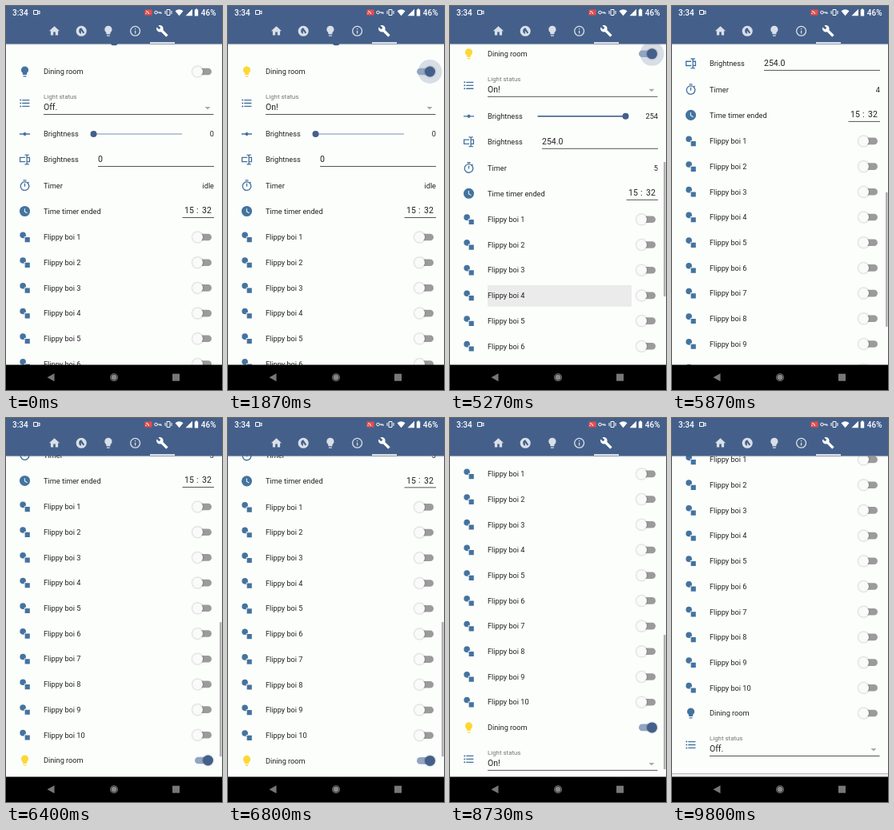
An HTML page that plays this animation: 270 by 480 pixels, repeating every 9.87 s.

```html
<!DOCTYPE html>
<html lang="en">
<head>
<meta charset="utf-8">
<title>Smart home controls</title>
<style>
  html, body { margin: 0; height: 100%; overflow: hidden; background: #fcfefc; }
  svg { display: block; width: 100vw; height: 100vh; }
  text { font: 9.2px Roboto, sans-serif; fill: #212121; }
  .big { font-size: 10.5px; }
  .small { font-size: 7.9px; fill: #757575; }
  .end { text-anchor: end; }
  .icon { fill: #44739e; fill-rule: evenodd; }
  .line { stroke: #555; stroke-width: 1; }
  .thumb { filter: drop-shadow(0 .7px .8px rgba(0, 0, 0, .35)); }
</style>
</head>
<body>
<svg id="stage" viewBox="0 0 270 480"></svg>
<script>
const LOOP = 9870, BLUE = '#44608a';
const icons = {
  bulb: 'M12 2A7 7 0 0 0 5 9C5 11.38 6.19 13.47 8 14.74V17A1 1 0 0 0 9 18H15A1 1 0 0 0 16 17V14.74C17.81 13.47 19 11.38 19 9A7 7 0 0 0 12 2M9 21A1 1 0 0 0 10 22H14A1 1 0 0 0 15 21V20H9Z',
  list: 'M7 5H21V7H7ZM7 11H21V13H7ZM7 17H21V19H7Z' + [6, 12, 18].map(y => `M2.5 ${y}a1.5 1.5 0 1 0 3 0a1.5 1.5 0 1 0 -3 0`).join(''),
  slider: 'M2 11H9.17C9.58 9.83 10.69 9 12 9S14.42 9.83 14.83 11H22V13H14.83C14.42 14.17 13.31 15 12 15S9.58 14.17 9.17 13H2Z',
  textbox: 'M17 7H22V17H17V19A1 1 0 0 0 18 20H20V22H17.5C16.95 22 16 21.55 16 21C16 21.55 15.05 22 14.5 22H12V20H14A1 1 0 0 0 15 19V5A1 1 0 0 0 14 4H12V2H14.5C15.05 2 16 2.45 16 3C16 2.45 16.95 2 17.5 2H20V4H18A1 1 0 0 0 17 5ZM2 7H13V9H4V15H13V17H2ZM20 15V9H17V15Z',
  timer: 'M12 20A7 7 0 1 1 12 6A7 7 0 0 1 12 20M19.03 7.39L20.45 5.97C20 5.46 19.55 5 19.04 4.56L17.62 6A9 9 0 1 0 19.03 7.39M11 14H13V8H11ZM15 1H9V3H15Z',
  clock: 'M12 2A10 10 0 1 0 22 12A10 10 0 0 0 12 2M16.2 16.2L11 13V7H12.5V12.2L17 14.9Z',
  shapes: 'M14.2 8A5.8 5.8 0 1 0 8.4 13.8H10.9V10.9H13.5A5.8 5.8 0 0 0 14.2 8M12.2 12.2H21.6V21.6H12.2Z',
  home: 'M10 20V14H14V20H19V12H22L12 3L2 12H5V20Z',
  dial: 'M12 2A10 10 0 1 0 22 12A10 10 0 0 0 12 2M12 6L18 15L15.5 17L11.5 11V17.5A6 6 0 0 1 12 6',
  info: 'M11 7H13V9H11ZM11 11H13V17H11ZM12 2A10 10 0 1 0 22 12A10 10 0 0 0 12 2M12 4A8 8 0 1 1 4 12A8 8 0 0 1 12 4',
  wrench: 'M22.7 19L13.6 9.9C14.5 7.6 14 4.9 12.1 3C10.1 1 7.1 .6 4.7 1.7L9 6L6 9L1.6 4.7C.4 7.1 .9 10.1 2.9 12.1C4.8 14 7.5 14.5 9.8 13.6L18.9 22.7C19.3 23.1 19.9 23.1 20.3 22.7L22.6 20.4C23.1 20 23.1 19.3 22.7 19Z'
};

const icon = (name, x, y, attrs = 'class="icon"') =>
  `<path d="${icons[name]}" transform="translate(${x - 7.9} ${y - 7.9}) scale(.657)" ${attrs}/>`;
const text = (x, y, str, attrs = '') => `<text x="${x}" y="${y + 3.3}" ${attrs}>${str}</text>`;
const line = (x1, x2, y, attrs = 'class="line"') => `<path d="M${x1} ${y}H${x2}" ${attrs}/>`;
const row = (y, name, label, extra = '') => icon(name, 23.5, y) + text(47, y, label) + extra;
const toggle = (y, kind = '') =>
  `<rect class="${kind}track" x="236" y="${y - 4.3}" width="21" height="8.6" rx="4.3" fill="#9b9b9b"/>
   <circle class="thumb ${kind}thumb" cx="239.5" cy="${y}" r="6.5" fill="#fafafa"/>`;

const lightRows = y => `
  ${icon('bulb', 23.5, y, 'class="icon lightbulb"')}${text(47, y, 'Dining room')}${toggle(y, 'light-')}
  ${icon('list', 23.5, y + 39.5)}${text(47, y + 31, 'Light status', 'class="small"')}
  ${text(47, y + 45, 'Off.', 'class="big status"')}
  <path d="M248.5 ${y + 44}h7l-3.5 3.5z" fill="#aaa"/>${line(47, 259.5, y + 53.5)}`;

const flippers = Array.from({length: 10}, (_, i) => {
  const y = 289 + 31.7 * i;
  return row(y, 'shapes', `Flippy boi ${i + 1}`, toggle(y));
}).join('');

const content = `
  <rect y="-60" width="270" height="741" fill="#fcfefc"/>
  <rect y="681" width="270" height="1" fill="#bbb"/>
  <rect x="131" y="43" width="8.5" height="6.3" rx="3" fill="${BLUE}"/>
  <rect id="press" x="47" y="371" width="180" height="27" fill="#ebebeb"/>
  <circle id="ripple" cx="252.5" cy="82" fill="${BLUE}" opacity=".2"/>
  ${lightRows(82)}
  ${row(160, 'slider', 'Brightness')}
  ${line(110, 220, 160, 'stroke="#a4b3cd" stroke-width="1.4"')}
  <path id="level" stroke="${BLUE}" stroke-width="1.4"/>
  <circle id="knob" cy="160" r="4" fill="${BLUE}"/>
  ${text(260, 160, '0', 'class="end" id="amount"')}
  ${row(192, 'textbox', 'Brightness')}
  ${text(115, 191.5, '0', 'class="big" id="field"')}${line(115, 260, 200.5)}
  ${row(224.5, 'timer', 'Timer')}${text(260, 224.5, 'idle', 'class="end" id="timer"')}
  ${row(256.5, 'clock', 'Time timer ended')}
  ${text(223, 256, '15', 'class="big"')}${text(238, 255.5, ':', 'class="big"')}${text(245, 256, '32', 'class="big"')}
  ${line(220.5, 260, 264.5)}
  ${flippers}${lightRows(606)}`;

const statusBar = `
  ${text(8, 8.3, '3:34', 'style="fill:#fff;font-size:10px;font-weight:500"')}
  <g fill="none" stroke="#fff" stroke-width="1">
    <path d="M34.5 5.5h5v5h-5zM39.5 7.5l2.5-1.5v4l-2.5-1.5"/>
    <circle cx="187.5" cy="8" r="1.8"/><path d="M189.5 8h4.5v2M192 8v1.5"/>
    <path d="M201 4.5h4v7h-4zM199 6v4M207 6v4"/>
  </g>
  <rect x="173.5" y="4.5" width="9" height="7" fill="#e94c4c"/>
  <path d="M175 10v-1.5M175 6.5a3.5 3.5 0 0 1 3.5 3.5" fill="none" stroke="#fff"/>
  <path d="M211.5 6.3Q216.5 2 221.5 6.3L216.5 12.3zM224.5 12.3h8.5v-8.5zM235.8 4.5h1.2v-1h2v1h1.2v8h-4.4z" fill="#fff"/>
  ${text(262.5, 8.3, '46%', 'class="end" style="fill:#fff;font-size:10px;font-weight:500"')}`;

const tabs = ['home', 'dial', 'bulb', 'info', 'wrench'].map((name, i) =>
  icon(name, 60.5 + 33.7 * i, 31.3, `fill="#fff" fill-rule="evenodd" opacity="${i < 4 ? .8 : 1}"`)).join('');

document.getElementById('stage').innerHTML = `
  <rect width="270" height="480" fill="#eceeec"/>
  <g id="content">${content}</g>
  <rect id="scrollbar" x="267" width="2.6" height="168" fill="#888"/>
  <rect width="270" height="47.5" fill="${BLUE}" style="filter:drop-shadow(0 .8px 1px rgba(0,0,0,.25))"/>
  ${statusBar}${tabs}
  <rect x="180" y="45.3" width="31" height="1.6" fill="#fff"/>
  <rect y="448.5" width="270" height="32" fill="#000"/>
  <path d="M51.5 464.2l9-5v10z" fill="#777"/>
  <circle cx="135" cy="464.2" r="5" fill="#777"/>
  <circle cx="135" cy="464.2" r="3.9" fill="#888" stroke="#222" stroke-width=".8"/>
  <rect x="208" y="459.7" width="9" height="9" fill="#777"/>`;

const $ = id => document.getElementById(id);
const set = (selector, attrs) => document.querySelectorAll(selector).forEach(el => {
  for (const key in attrs) el.setAttribute(key, attrs[key]);
});
const ramp = (t, from, to) => {
  const p = Math.min(1, Math.max(0, (t - from) / (to - from)));
  return p * p * (3 - 2 * p);
};
const mix = (a, b, p) => `color-mix(in srgb, ${b} ${p * 100}%, ${a})`;
const tint = (selector, a, b, p) =>
  document.querySelectorAll(selector).forEach(el => el.style.fill = mix(a, b, p));

const scrollPath = [[5130, 0], [5270, 22], [5500, 66], [5870, 120], [6070, 138], [6130, 142],
  [6400, 178], [6550, 181], [7070, 174], [7330, 171], [7470, 170], [8270, 170],
  [8470, 193], [8800, 226], [9150, 237]];

function scrollAt(t) {
  const i = scrollPath.findIndex(([time]) => time > t);
  if (i < 0) return 237;
  if (i === 0) return 0;
  const [t0, y0] = scrollPath[i - 1], [t1, y1] = scrollPath[i];
  return y0 + (y1 - y0) * (t - t0) / (t1 - t0);
}

function draw(t) {
  const scroll = scrollAt(t);
  set('#content', {transform: `translate(0 ${-scroll})`});
  set('#scrollbar', {
    y: 186.5 + .386 * scroll,
    opacity: .65 * (ramp(t, 5130, 5200) - ramp(t, 9350, 9700))
  });

  const on = ramp(t, 1270, 1420) - ramp(t, 9300, 9450);
  set('.light-thumb', {cx: 239.5 + 13 * on});
  tint('.light-thumb', '#fafafa', BLUE, on);
  tint('.light-track', '#9b9b9b', '#91a4c1', on);
  tint('.lightbulb', '#44739e', '#fdd835', ramp(t, 1450, 1700) - ramp(t, 9300, 9550));
  set('#ripple', {r: 15 * ramp(t, 1200, 1400)});
  const status = t >= 1670 && t < 9400 ? 'On!' : 'Off.';
  document.querySelectorAll('.status').forEach(el => el.textContent = status);

  const bright = t >= 3130;
  const knobX = 109.5 + 110 * ramp(t, 3100, 3240);
  set('#knob', {cx: knobX});
  set('#level', {d: `M109.5 160H${knobX}`});
  $('amount').textContent = bright ? '254' : '0';
  $('field').textContent = bright ? '254.0' : '0';
  $('timer').textContent = t < 4270 || t >= 9300 ? 'idle' : 5 - Math.max(0, Math.floor((t - 4300) / 1000));
  set('#press', {opacity: ramp(t, 5130, 5200) - ramp(t, 5330, 5500)});
}

const start = performance.now();
function tick() {
  draw((performance.now() - start) % LOOP);
  requestAnimationFrame(tick);
}
tick();
</script>
</body>
</html>
```
